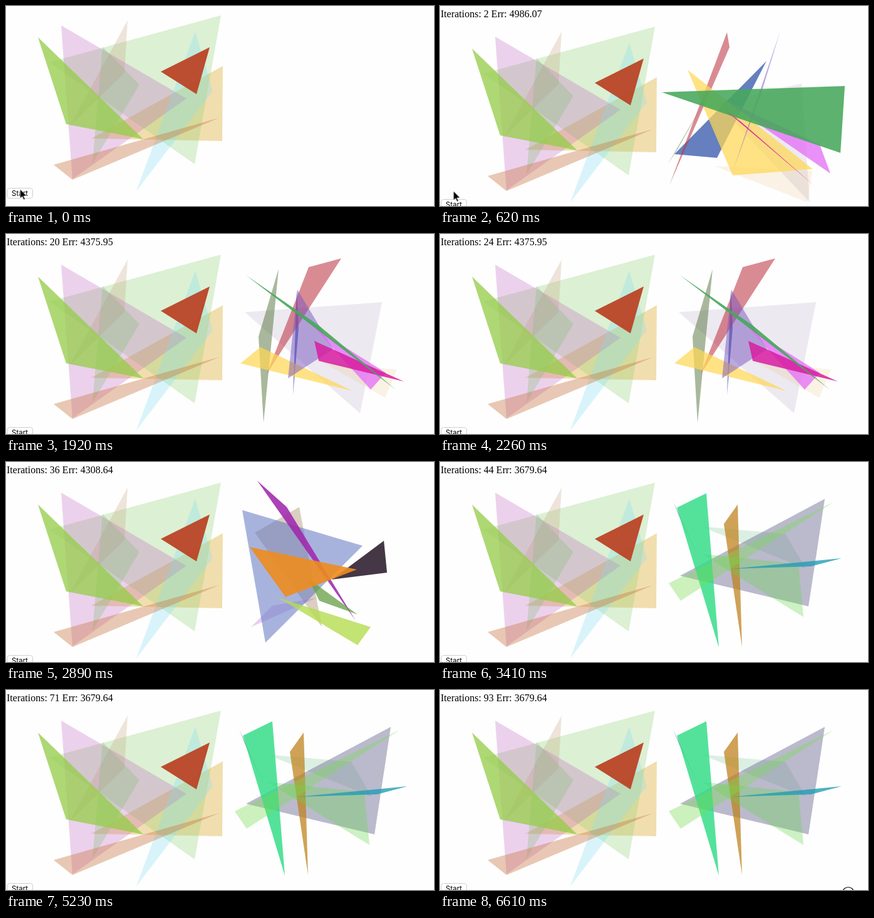
These frames come from a looping animation (683 by 320 pixels, 6650 ms). An HTML page:

```html
<!DOCTYPE html>
<html lang="en">
<head>
<meta charset="utf-8">
<title>Triangle evolution</title>
<style>
  html, body { margin: 0; width: 100%; height: 100%; overflow: hidden; background: #fefefe; }
  svg { display: block; width: 683px; height: 320px; }
  .status { font: 16px "Liberation Serif", "Times New Roman", serif; }
  .label { font: 11.5px Inter, Arial, sans-serif; }

  .page, .guess, .cursor, .ring { animation: 6650ms step-end infinite; }
  .guess, .ring { visibility: hidden; }
  .page { animation-name: push; }
  .first { animation-name: first; }
  .second { animation-name: second; }
  .third { animation-name: third; }
  .best { animation-name: best; }
  .cursor { animation-name: cursor; animation-timing-function: linear; }
  .ring { animation-name: ring; }

  /* the status line pushes the page down once the run starts */
  @keyframes push { 0% { transform: none } 7.97%, 100% { transform: translateY(18px) } }
  @keyframes first { 7.97% { visibility: visible } 21.05%, 100% { visibility: hidden } }
  @keyframes second { 21.05% { visibility: visible } 39.4%, 100% { visibility: hidden } }
  @keyframes third { 39.4% { visibility: visible } 44.66%, 100% { visibility: hidden } }
  @keyframes best { 44.66%, 100% { visibility: visible } }
  @keyframes cursor {
    0%, 4.06% { transform: translate(22.5px, 293px) }
    7.97%, 14.59% { transform: translate(21.5px, 296px) }
    19.55%, 100% { transform: translate(23px, 325px) }
  }
  @keyframes ring {
    95.4% { visibility: visible; transform: translate(-1px, 1px) }
    99.4%, 100% { visibility: visible; transform: none }
  }
</style>
</head>
<body>
<svg viewBox="0 0 683 320">
  <g class="page">
    <polygon points="346,96 345,216 136,212" fill="#e0b440" fill-opacity=".42"/>
    <polygon points="69,90 343,15 301,253" fill="#87cd69" fill-opacity=".28"/>
    <polygon points="194,23 189,107 102,192" fill="#be966e" fill-opacity=".25"/>
    <polygon points="88,31 288,148 106,277" fill="#be5abe" fill-opacity=".27"/>
    <polygon points="154,65 213,126 138,252" fill="#82be78" fill-opacity=".3"/>
    <polygon points="302,41 330,136 208,296" fill="#82dcf0" fill-opacity=".3"/>
    <polygon points="76,254 340,179 106,278" fill="#c87846" fill-opacity=".4"/>
    <polygon points="51,50 96,189 219,213" fill="#96cd4b" fill-opacity=".77"/>
    <polygon points="247,105 325,66 304,141" fill="#bb4526" fill-opacity=".95"/>
    <rect x="2" y="291.5" width="40.5" height="16" rx="3.5" fill="#fff" stroke="#d0d0d0"/>
    <text class="label" x="9" y="304">Start</text>
  </g>

  <g class="guess first">
    <polygon points="577,124 590,314 440,155" fill="#a08cb4" fill-opacity=".18"/>
    <polygon points="438,256 594,264 586,314" fill="#e6be6e" fill-opacity=".18"/>
    <polygon points="363,254 379,229 435,130" fill="#55733a" fill-opacity=".5"/>
    <polygon points="521,88 442,243 374,237" fill="#4b69b4" fill-opacity=".85"/>
    <polygon points="458,42 462,66 366,287" fill="#be3746" fill-opacity=".58"/>
    <polygon points="395,102 595,261 467,271" fill="#ffd755" fill-opacity=".72"/>
    <polygon points="543,40 514,135 468,262" fill="#7855be" fill-opacity=".5"/>
    <polygon points="450,148 606,222 623,268" fill="#e46ef8" fill-opacity=".76"/>
    <polygon points="354,138 646,128 639,235" fill="#46a85a" fill-opacity=".88"/>
    <polygon points="457,168 480,185 599,289" fill="#d81ea0" fill-opacity=".88"/>
  </g>

  <g class="guess second">
    <polygon points="381,125 600,109 565,287" fill="#a08cb4" fill-opacity=".18"/>
    <polygon points="505,205 624,217 605,262" fill="#e6be6e" fill-opacity=".18"/>
    <polygon points="435,56 411,302 403,164" fill="#55733a" fill-opacity=".5"/>
    <polygon points="464,90 467,150 458,258" fill="#4b69b4" fill-opacity=".85"/>
    <polygon points="483,53 535,39 416,224" fill="#be3746" fill-opacity=".58"/>
    <polygon points="406,181 553,251 374,207" fill="#ffd755" fill-opacity=".72"/>
    <polygon points="465,89 522,184 450,231" fill="#7855be" fill-opacity=".5"/>
    <polygon points="492,150 606,222 582,249" fill="#e46ef8" fill-opacity=".76"/>
    <polygon points="492,171 635,236 499,203" fill="#d81ea0" fill-opacity=".86"/>
    <polygon points="383,66 500,147 622,249" fill="#46a85a" fill-opacity=".9"/>
  </g>

  <g class="guess third">
    <polygon points="468,72 397,113 504,264" fill="#a58a68" fill-opacity=".4"/>
    <polygon points="391,264 425,230 497,217" fill="#b464dc" fill-opacity=".3"/>
    <polygon points="377,77 569,134 414,289" fill="#6478c3" fill-opacity=".56"/>
    <polygon points="603,126 608,177 520,188" fill="#3c2d3d" fill-opacity=".95"/>
    <polygon points="401,30 448,72 558,254" fill="#a028ad" fill-opacity=".88"/>
    <polygon points="483,187 561,244 500,222" fill="#5f9b3c" fill-opacity=".72"/>
    <polygon points="389,136 560,172 446,216" fill="#ee8c20" fill-opacity=".9"/>
    <polygon points="434,217 582,264 561,293" fill="#b4dc50" fill-opacity=".8"/>
  </g>

  <g class="guess best">
    <polygon points="416,103 551,115 584,171" fill="#82cd9b" fill-opacity=".28"/>
    <polygon points="614,59 383,182 588,231" fill="#78789b" fill-opacity=".51"/>
    <polygon points="372,63 382,88 415,157" fill="#505f6e" fill-opacity=".6"/>
    <polygon points="475,68 453,99 482,296" fill="#be821e" fill-opacity=".74"/>
    <polygon points="417,147 572,163 580,248" fill="#64d746" fill-opacity=".32"/>
    <polygon points="417,147 572,163 580,248" fill="#505064" fill-opacity=".24" clip-path="polygon(614px 59px, 383px 182px, 588px 231px)" style="clip-path:none;display:none"/>
    <polygon points="378,73 425,50 445,297" fill="#32dc87" fill-opacity=".83"/>
    <polygon points="628,64 365,194 384,222" fill="#78dc50" fill-opacity=".37"/>
    <polygon points="465,171 641,154 592,167" fill="#1e9bb4" fill-opacity=".78"/>
  </g>

  <text class="status" x="1" y="18"></text>
  <path class="cursor" d="M0 0V15l3.4-3.2 2.4 5.4 2.3-1-2.4-5.2h4.8z" stroke="#fff" stroke-width=".8"/>
  <circle class="ring" cx="651.5" cy="325" r="9.5" fill="#fff" stroke="#111" stroke-width="1.2"/>
</svg>
<script>
  const LOOP = 6650, START = 530, TICK = 86.76;
  const counts = [[530, 1], [620, 2], [1920, 20], [2890, 36], [3410, 44], [5230, 71], [6430, 92], [6610, 93]];
  const errors = [[0, "4986.07"], [1400, "4375.95"], [2620, "4308.64"], [2970, "3679.64"]];
  const status = document.querySelector(".status");
  const origin = performance.now();

  function iterations(t) {
    const next = counts.findIndex(([time]) => time > t);
    if (next < 0) return counts[counts.length - 1][1];
    const [t0, n0] = counts[next - 1], [t1, n1] = counts[next];
    const tick = Math.floor((t - t0) / TICK + 0.05) * TICK;
    return Math.floor(n0 + (n1 - n0) * Math.min(tick / (t1 - t0), 0.999) + 0.01);
  }

  function render() {
    const t = (performance.now() - origin) % LOOP;
    const error = errors.filter(([time]) => time <= t).pop()[1];
    status.textContent = t < START ? "" : `Iterations: ${iterations(t)} Err: ${error}`;
    requestAnimationFrame(render);
  }
  render();
</script>
</body>
</html>
```
